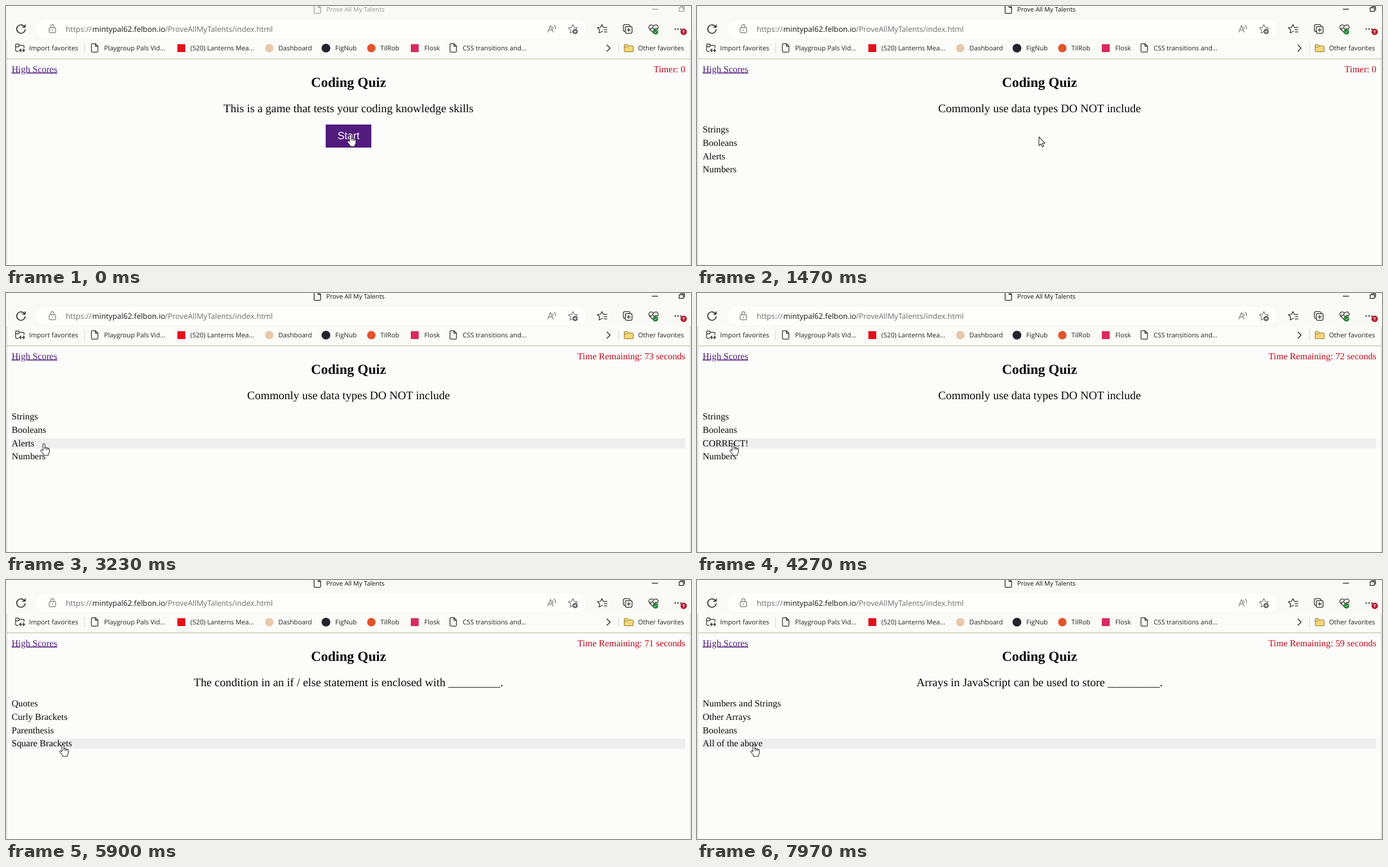
Recreate the animation shown at these times as an HTML page. Size 1215x461 px, loop 8 s.

```html
<!DOCTYPE html>
<html lang="en">
<head>
<meta charset="utf-8">
<title>Coding Quiz</title>
<style>
  html, body { margin: 0; width: 100%; height: 100%; overflow: hidden; background: #fcfdfb; }
  svg { display: block; width: 1215px; height: 461px; }
  text { text-rendering: geometricPrecision; white-space: pre; }
  .ui { font: 11.6px "Open Sans", "Noto Sans", sans-serif; fill: #222; }
  .url { font-size: 13.5px; fill: #6c6c6c; }
  .page { font: 16.45px "Liberation Serif", "Times New Roman", serif; fill: #080808; }
  .icon { fill: none; stroke: #242424; stroke-width: 1.25; stroke-linecap: round; stroke-linejoin: round; }
  .soft { stroke: #777; }
  .titlebar { --ink: #161616; }
  .titlebar.idle { --ink: #989898; }
  .titlebar text { font-size: 11.2px; fill: var(--ink); }
  .titlebar .icon { stroke: var(--ink); }
  .link { fill: #4d1a79; text-decoration: underline; }
  .timer { fill: #c00418; text-anchor: end; }
  .heading { font-size: 24.6px; font-weight: bold; text-anchor: middle; }
  .question { font-size: 20.5px; text-anchor: middle; }
  .button { font: 18.5px "Liberation Sans", Arial, sans-serif; fill: #fff; text-anchor: middle; }
  .cursor path { fill: #fff; stroke: #26262c; stroke-width: 1.1; stroke-linejoin: round; }
</style>
</head>
<body>
<svg viewBox="0 0 1215 461">
  <defs>
    <path id="doc" d="M1.5 0H7.5L12 4.5V13.5Q12 15 10.5 15H2Q.5 15 .5 13.5V1.5Q.5 0 2 0M7.5 0V4.5H12"/>
    <path id="star" d="M0 -8L2.4 -2.9L8 -2.2L3.9 1.6L5 7.2L0 4.5L-5 7.2L-3.9 1.6L-8 -2.2L-2.4 -2.9Z"/>
  </defs>

  <!-- Browser chrome -->
  <rect width="1215" height="60" fill="#f9faf5"/>
  <rect y="60" width="1215" height="34" fill="#fbfcf8"/>
  <rect x="54" y="25" width="975" height="32" rx="16" fill="#fefefd"/>
  <path d="M1.5 60V461M1213.5 60V461" stroke="#c9c9c5" fill="none"/>
  <path d="M2 94.2H1213" stroke="#bfc1a4" stroke-width="1.3"/>

  <g class="ui titlebar" id="titlebar">
    <use class="icon" href="#doc" x="546" y="-2"/>
    <text x="568" y="10">Prove All My Talents</text>
    <path class="icon" stroke-width="1" d="M1146 5.5H1156M1194 3H1201.500V9.500H1194ZM1196 1H1203.500V7.500"/>
  </g>

  <g class="ui">
    <text class="url" x="106" y="46">https://</text>
    <text class="url" x="153" y="46" style="fill:#171717">mintypal62.felbon.io</text>
    <text class="url" x="282" y="46">/ProveAllMyTalents/index.html</text>

    <text x="41" y="79">Import favorites</text>
    <text x="174" y="79">Playgroup Pals Vid...</text>
    <text x="327" y="79">(520) Lanterns Mea...</text>
    <text x="483" y="79">Dashboard</text>
    <text x="584" y="79">FigNub</text>
    <text x="664" y="79">TilRob</text>
    <text x="742" y="79">Flosk</text>
    <text x="810" y="79">CSS transitions and...</text>
    <text x="1121" y="79">Other favorites</text>
  </g>

  <g class="icon">
    <path stroke-width="1.6" d="M33 37.200A7.500 7.500 0 1 0 34 42M34 33.500V37.800H29.500"/>
    <use href="#doc" x="151" y="67"/>
    <use href="#doc" x="787" y="67"/>
    <path stroke-width="1.5" d="M1066 69.500L1071.500 75L1066 80.500"/>
    <path d="M22 80.500H18.500Q17 80.500 17 79V69Q17 67.500 18.500 67.500H22L24 70H30.500Q32 70 32 71.500V74M17 72.500H22L24 70M24 79H33M26.500 76.500L24 79L26.500 81.500M30.500 76.500L33 79L30.500 81.500"/>
    <path d="M1058 45L1052 48L1053 42.500L1049 38.700L1054.500 38L1057 33L1059.400 38H1066M1061 42H1066M1061 46H1066"/>
    <path d="M1098 45.500Q1095 45 1095 42.500V36Q1095 33 1098 33H1104Q1106.500 33 1107 36M1101 36.500H1108Q1110.500 36.500 1110.500 39V46Q1110.500 48.500 1108 48.500H1101Q1098.500 48.500 1098.500 46V39Q1098.500 36.500 1101 36.500M1104.500 39.500V45.500M1101.500 42.500H1107.500"/>
    <path d="M1148.500 48L1141.500 41C1137.500 36 1144 30.500 1148.500 36C1153 30.500 1159.500 36 1155.500 41M1141 40.500H1145L1147 37.500L1149.500 43L1151.500 40H1155"/>
  </g>
  <g class="icon soft">
    <path d="M78 38.500H86.500Q88 38.500 88 40V46Q88 47.500 86.500 47.500H78Q76.500 47.500 76.500 46V40Q76.500 38.500 78 38.500M79.500 38V36Q79.500 33 82.300 33Q85 33 85 36V38"/>
    <path d="M961 46.500L965.800 34.500L970.500 46.500M962.700 42.500H969M969.500 36.500Q971 38.500 970.500 40.500M972.500 34Q975.500 37 974.500 41"/>
    <use href="#star" x="1005.500" y="41"/>
  </g>
  <circle cx="82.300" cy="43" r="1" fill="#666"/>
  <circle cx="1009.500" cy="45.500" r="4.700" fill="#666"/>
  <path d="M1007 45.500H1012M1009.500 43V48" stroke="#fff"/>
  <circle cx="1152" cy="46" r="4.800" fill="#218234"/>
  <path d="M1149.700 46L1151.400 47.700L1154.500 44.500" stroke="#fff" fill="none"/>
  <g fill="#222"><circle cx="1187" cy="41" r="1.200"/><circle cx="1192" cy="41" r="1.200"/><circle cx="1197" cy="41" r="1.200"/></g>
  <circle cx="1202" cy="46" r="5.700" fill="#b4182c"/>
  <path d="M1202 49V43.500M1199.800 45.500L1202 43.200L1204.200 45.500" stroke="#fff" fill="none"/>
  <path d="M139.500 66V84M1086.500 66V84" stroke="#d4d4cf"/>
  <rect x="304" y="68" width="14" height="14" fill="#e3101c"/>
  <circle cx="467" cy="75" r="7.500" fill="#e8c8aa"/>
  <circle cx="567.500" cy="75" r="7.800" fill="#22242a"/>
  <circle cx="648" cy="75" r="7.500" fill="#e4532c"/>
  <rect x="718" y="68" width="14" height="14" fill="#d92b60"/>
  <path d="M1098 68.500H1102L1104.500 71H1111Q1112.500 71 1112.500 72.500V80Q1112.500 81.500 1111 81.500H1098Q1096.500 81.500 1096.500 80V70Q1096.500 68.500 1098 68.500M1096.500 73H1102L1104.500 71" fill="#f5d778" stroke="#8e7229"/>

  <!-- Quiz page -->
  <rect id="band" x="10" width="1195" height="18" fill="#eeeeef"/>
  <g class="page">
    <text class="link" x="10" y="117.500">High Scores</text>
    <text class="timer" id="timer" x="1205" y="117.500"></text>
    <text class="heading" x="607.500" y="144">Coding Quiz</text>
    <text class="question" id="question" x="607.500" y="189"></text>
    <g id="list"></g>
  </g>
  <g id="start">
    <rect x="567" y="211" width="81" height="41" fill="#511b7d"/>
    <text class="button" x="607.500" y="237">Start</text>
  </g>

  <g class="cursor" id="cursor">
    <path id="arrow" d="M.5 0V15.500L4 12.300L6.500 17.800L9 16.700L6.500 11.300H11.300Z"/>
    <g id="hand">
      <path d="M-1.700 1.500Q-1.500 0 0 0Q1.500 0 1.700 1.500V7Q3.300 5.800 4.400 7.500Q6 6.700 7 8.500Q9.500 7.800 9.600 10.500V14.500Q9.500 17 7.700 18.500V21H-.5V19.500L-5.300 13.500Q-6.300 11.500 -4.300 11Q-3 10.800 -1.700 12.500Z"/>
      <path style="fill:none" d="M1.700 7V10.500M4.400 7.500V11M7 8.500V11.500"/>
    </g>
  </g>
</svg>

<script>
const LOOP = 8000, CLICK = 1070, ACTIVE = 900;
const ROW_TOP = 211, ROW_STEP = 23.75, ROW_HEIGHT = 18;

const screens = [
  { at: 0, question: 'This is a game that tests your coding knowledge skills', answers: [] },
  { at: CLICK, question: 'Commonly use data types DO NOT include',
    answers: ['Strings', 'Booleans', 'Alerts', 'Numbers'], pick: 2, pickAt: 3670, verdict: 'CORRECT!' },
  { at: 4670, question: 'The condition in an if / else statement is enclosed with _________.',
    answers: ['Quotes', 'Curly Brackets', 'Parenthesis', 'Square Brakets'.replace('ak', 'ack')],
    pick: 3, pickAt: 6200, verdict: 'WRONG!' },
  { at: 7200, question: 'Arrays in JavaScript can be used to store _________.',
    answers: ['Numbers and Strings', 'Other Arrays', 'Booleans', 'All of the above'] }
];

// Pointer stops: time, x, y
const path = [
  [0, 611, 229], [1100, 611, 229], [1350, 606, 233], [1550, 606, 233],
  [2080, 70, 268], [3000, 70, 268], [3500, 64, 268], [4700, 64, 268],
  [4960, 83.5, 285], [5150, 83.5, 285], [5500, 101, 295], [5750, 101, 293], [LOOP, 101, 293]
];

const $ = id => document.getElementById(id);
const show = (id, on) => $(id).style.display = on ? '' : 'none';
const setText = (el, s) => { if (el.textContent !== s) el.textContent = s; };

const rows = [0, 1, 2, 3].map(i => {
  const row = document.createElementNS('http://www.w3.org/2000/svg', 'text');
  row.setAttribute('x', 10);
  row.setAttribute('y', 225 + i * ROW_STEP);
  return $('list').appendChild(row);
});

function pointerAt(t) {
  const i = path.findIndex(p => p[0] > t);
  const [t0, x0, y0] = path[i - 1], [t1, x1, y1] = path[i];
  const u = (t - t0) / (t1 - t0), k = u * u * (3 - 2 * u);
  return [x0 + (x1 - x0) * k, y0 + (y1 - y0) * k];
}

function timerText(t) {
  const ticks = Math.floor((t - CLICK) / 1000);
  if (ticks < 1) return 'Timer: 0';
  const penalty = ticks >= 6 ? 10 : 0;
  return `Time Remaining: ${75 - ticks - penalty} seconds`;
}

function draw(now) {
  const t = now % LOOP;
  const screen = screens.filter(s => s.at <= t).pop();
  const [x, y] = pointerAt(t);
  const started = t >= CLICK;

  const row = Math.floor((y - ROW_TOP) / ROW_STEP);
  const hover = started && y - ROW_TOP - row * ROW_STEP <= ROW_HEIGHT;

  $('titlebar').classList.toggle('idle', t < ACTIVE);
  setText($('timer'), timerText(t));
  setText($('question'), screen.question);
  rows.forEach((el, i) => {
    const judged = i === screen.pick && t >= screen.pickAt;
    setText(el, judged ? screen.verdict : screen.answers[i] || '');
  });

  show('start', !started);
  show('band', hover);
  $('band').setAttribute('y', ROW_TOP + row * ROW_STEP);
  show('hand', hover || !started);
  show('arrow', started && !hover);
  $('cursor').setAttribute('transform', `translate(${x} ${y})`);
}

function tick() {
  draw(performance.now());
  requestAnimationFrame(tick);
}
tick();
</script>
</body>
</html>
```
